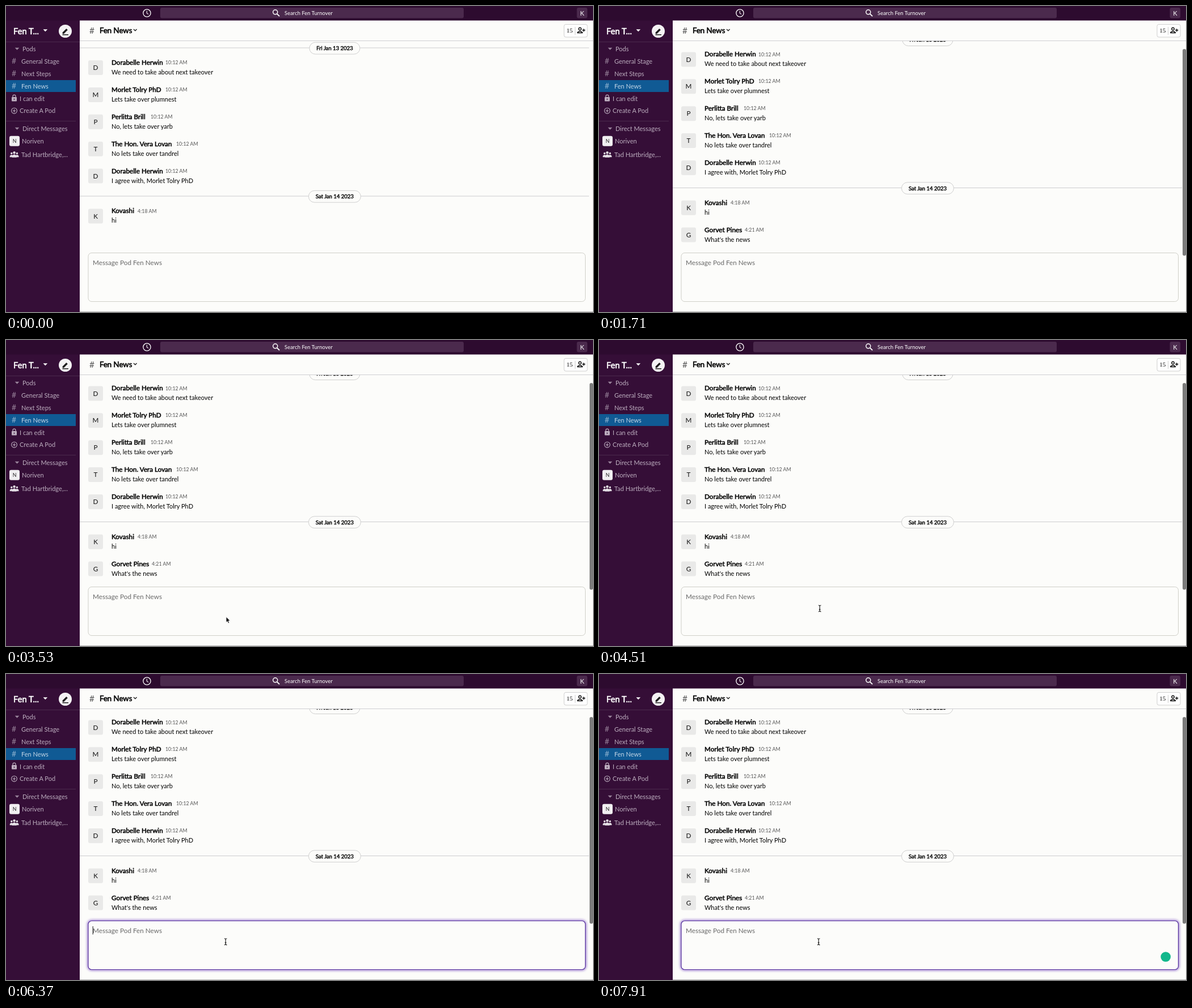
An HTML page that plays this animation: 1035 by 541 pixels, repeating every 8000 ms.

```html
<!DOCTYPE html>
<html lang="en">
<head>
<meta charset="utf-8">
<title>Team chat</title>
<style>
  html, body { margin: 0; width: 100%; height: 100%; overflow: hidden; background: #fcfcfa; }
  svg { display: block; width: 100vw; height: 100vh; font-family: Lato, "Open Sans", sans-serif; }
  text { white-space: pre; }
</style>
</head>
<body>
<svg id="stage" viewBox="0 0 1035 541">
  <defs>
    <clipPath id="feedClip"><rect x="130" y="62" width="905" height="374"/></clipPath>
    <filter id="blur" x="-5%" y="-20%" width="110%" height="140%"><feGaussianBlur stdDeviation="2"/></filter>
  </defs>
  <rect width="1035" height="541" fill="#fcfcfa"/>
  <g id="feed" clip-path="url(#feedClip)"><g id="scroller"></g></g>
  <g id="header"></g>
  <g id="sidebar"></g>
  <g id="topbar"></g>
  <g id="composer"></g>
  <path d="M130 540.5H1035" stroke="#b9b9b9"/>
  <rect id="thumb" x="1029" y="76" width="6" height="365.5" rx="3" fill="#7b7b7b"/>
  <path id="arrow" d="M0 0V9.6L2.2 7.6L3.7 11.2L5.4 10.5L3.9 7H6.9Z" fill="#000" stroke="#fff" stroke-width=".7"/>
  <path id="beam" d="M-2.3 -5.6Q0 -5.6 0 -4Q0 -5.6 2.3 -5.6M0 -4.5V4.5M-2.3 5.6Q0 5.6 0 4Q0 5.6 2.3 5.6M-1.3 1.8H1.3"
        fill="none" stroke="#111" stroke-width="1.1"/>
</svg>
<script>
const LOOP = 8000;
const TIMES = { message: 1350, arrow: 2600, beam: 4400, focus: 5600, badge: 7700 };
const SCROLL = 14.6;
const PAGE = "#fcfcfa", SIDE = "#350e37", TOP = "#2d0b2f", FIELD = "#4b2a4d";
const NS = "http://www.w3.org/2000/svg";
const $ = id => document.getElementById(id);

function add(parent, tag, attrs, content) {
  const node = document.createElementNS(NS, tag);
  for (const key in attrs) node.setAttribute(key, attrs[key]);
  if (content !== undefined) node.textContent = content;
  parent.appendChild(node);
  return node;
}
const label = (parent, content, x, y, size, fill, extra) =>
  add(parent, "text", { x, y, "font-size": size, fill, ...extra }, content);
// Regular letters thickened by an outline, keeping the regular spacing.
const heavy = (parent, content, x, y, size, fill, extra) =>
  label(parent, content, x, y, size, fill, { stroke: fill, "stroke-width": size * .045, ...extra });
const box = (parent, x, y, width, height, rx, fill, extra) =>
  add(parent, "rect", { x, y, width, height, rx, fill, ...extra });
const line = (parent, d, stroke, width = 1, extra) =>
  add(parent, "path", { d, stroke, "stroke-width": width, fill: "none", ...extra });
const shape = (parent, d, fill) => add(parent, "path", { d, fill });
const disc = (parent, cx, cy, r, fill, extra) => add(parent, "circle", { cx, cy, r, fill, ...extra });
const centered = { "text-anchor": "middle" };

function buildTopbar(g) {
  const white = "#fff";
  box(g, 0, 0, 1035, 25.6, 0, TOP);
  disc(g, 248.5, 12.5, 6.6, "none", { stroke: white, "stroke-width": 1.3 });
  line(g, "M248.3 8.6V12.8L251.2 14.6", white, 1.1);
  box(g, 272, 3, 535, 18.5, 3, FIELD);
  disc(g, 474.8, 10.8, 4, "none", { stroke: white, "stroke-width": 1.5 });
  line(g, "M477.8 13.8L482.2 18.2", white, 1.8);
  label(g, "Search Fen Turnover", 491, 16.3, 9.5, white);
  box(g, 1006.5, 3, 18.5, 18.5, 3, FIELD);
  label(g, "K", 1015.8, 16.7, 11, white, centered);
}

function buildSidebar(g) {
  const soft = "#bdaebf", dim = "#9a859c", bright = "#e4dfe5";
  box(g, 0, 25, 130, 516, 0, SIDE);
  line(g, "M0 63.5H130M0 203.5H123", "#4b2a4d");
  heavy(g, "Fen T...", 13, 50, 14.66, "#fff");
  shape(g, "M65.5 41.3H73.2L69.3 45.3Z", "#fff");
  disc(g, 104.5, 44.5, 11.5, "#f4f2f4");
  shape(g, "M99.6 46.8L106.4 39.9L108.8 42.3L102 49.2H99.6Z", "#1d1c1d");
  line(g, "M99.5 50.8H110", "#1d1c1d", 1.5);

  box(g, 0, 131, 123, 21, 0, "#105a94");
  for (const [name, y] of [["Pods", 80], ["Direct Messages", 221]]) {
    shape(g, `M15.7 ${y - 6.2}H23.3L19.5 ${y - 2.2}Z`, dim);
    label(g, name, 29, y, 11, soft);
  }
  ["General Stage", "Next Steps", "Fen News"].forEach((name, i) => {
    const y = 101.8 + i * 22;
    label(g, "#", 10, y + .2, 14, i === 2 ? "#8fb3d0" : dim);
    label(g, name, 27, y, 11, i === 2 ? "#c4d6e6" : soft);
  });

  box(g, 10, 161, 9, 7.6, 1, soft);
  line(g, "M12 161.5V159.6A2.5 2.5 0 0 1 17 159.6V161.5", soft, 1.2);
  disc(g, 14.5, 164.8, 1, SIDE);
  label(g, "I can edit", 24, 167.5, 11, soft);
  disc(g, 14.5, 185.2, 4.9, "none", { stroke: soft, "stroke-width": 1.1 });
  line(g, "M14.5 182.5V188M11.8 185.2H17.2", soft, 1.1);
  label(g, "Create A Pod", 24, 189.4, 11, soft);

  box(g, 6, 229.7, 18, 18, 3, "#f1eff1");
  label(g, "N", 15, 241.8, 8.8, "#1d1c1d", centered);
  label(g, "Noriven", 28, 243, 11, soft);
  for (const [x, y, r] of [[9.8, 260.5, 1.7], [19.4, 260.5, 1.7], [14.6, 259.2, 2.2]]) {
    disc(g, x, y, r, bright);
    shape(g, `M${x - r * 1.8} ${y + r * 3.9}V${y + r * 2.6}Q${x} ${y + r * .2} ${x + r * 1.8} ${y + r * 2.6}V${y + r * 3.9}Z`, bright);
  }
  label(g, "Tad Hartbridge,...", 27, 267, 11, soft);
}

function buildHeader(g) {
  box(g, 130, 25, 905, 37, 0, PAGE);
  line(g, "M130 61.5H1035", "#cfcfd2");
  label(g, "#", 147, 48.5, 15.5, "#555");
  heavy(g, "Fen News", 165, 48.2, 13.2, "#000");
  line(g, "M225 41L227.8 43.8L230.6 41", "#222", 1.4);
  box(g, 984, 32.5, 41, 22.5, 3, "#fff", { stroke: "#cfcfcf" });
  label(g, "15", 993.7, 47, 11, "#111", { ...centered, "font-family": "Liberation Serif, serif" });
  line(g, "M1003.5 37V51", "#cfcfcf");
  disc(g, 1012, 40.4, 2.2, "none", { stroke: "#111", "stroke-width": 1.4 });
  line(g, "M1007.8 47.5V46.6Q1012 42.9 1016.2 46.6V47.5Z", "#111", 1.4);
  line(g, "M1018.7 40.2V45.4M1016.1 42.8H1021.3", "#111", 1.4);
}

function addDate(g, content, y, half) {
  line(g, `M130 ${y - .7}H1028`, "#cdcdcf");
  box(g, 579.5 - half, y - 10.4, half * 2, 20.8, 10.4, PAGE, { stroke: "#cfcfcf" });
  heavy(g, content, 579.5, y + 3.4, 9.5, "#000", centered);
}

function addMessage(g, name, timeX, time, content, y) {
  const row = add(g, "g", {});
  box(row, 145, y - 8, 26, 26, 3, "#e9e9e8");
  label(row, name[0], 158, y + 9.2, 11.7, "#111", centered);
  heavy(row, name, 186, y, 11.73, "#000");
  label(row, time, timeX, y - .8, 8.8, "#555");
  label(row, content, 186, y + 17, 11, "#000");
  return row;
}

function buildFeed(g) {
  addDate(g, "Fri Jan 13 2023", 74.7, 44.5);
  [
    ["Dorabelle Herwin", 281, "We need to take about next takeover"],
    ["Morlet Tolry PhD", 281, "Lets take over plumnest"],
    ["Perlitta Brill", 255, "No, lets take over yarb"],
    ["The Hon. Vera Lovan", 300, "No lets take over tandrel"],
    ["Dorabelle Herwin", 281, "I agree with, Morlet Tolry PhD"],
  ].forEach(([name, x, content], i) => addMessage(g, name, x, "10:12 AM", content, 104 + i * 47.9));
  addDate(g, "Sat Jan 14 2023", 336.8, 46);
  addMessage(g, "Kovashi", 232, "4:18 AM", "hi", 366.4);
  return addMessage(g, "Gorvet Pines", 257, "4:21 AM", "What's the news", 414.2);
}

function buildComposer(g) {
  const frame = [145, 436.5, 876.5, 86, 6];
  const glow = box(g, ...frame, "none", { stroke: "#7a4fc0", "stroke-width": 3, filter: "url(#blur)" });
  const field = box(g, ...frame, PAGE);
  label(g, "Message Pod Fen News", 153, 457.8, 11.73, "#686868");
  const caret = line(g, "M153.2 446V460.5", "#111");
  const badge = disc(g, 999.2, 500, 8.8, "#12b88c");
  return { glow, field, caret, badge };
}

buildTopbar($("topbar"));
buildSidebar($("sidebar"));
buildHeader($("header"));
const newest = buildFeed($("scroller"));
const composer = buildComposer($("composer"));

const show = (node, on) => node.setAttribute("visibility", on ? "visible" : "hidden");
const move = (node, x, y) => node.setAttribute("transform", `translate(${x} ${y})`);

function render(t) {
  const arrived = t >= TIMES.message;
  const focused = t >= TIMES.focus;
  show(newest, arrived);
  show($("thumb"), arrived);
  move($("scroller"), 0, arrived ? -SCROLL : 0);

  show($("arrow"), t >= TIMES.arrow && t < TIMES.beam);
  move($("arrow"), 388.2, 489.6);
  show($("beam"), t >= TIMES.beam);
  const p = Math.min(1, Math.max(0, (t - TIMES.focus + 150) / 150));
  move($("beam"), 389.2 - 2 * p, 474.6 - 1.3 * p);

  show(composer.glow, focused);
  composer.field.setAttribute("stroke", focused ? "#55309c" : "#cfcfc8");
  composer.field.setAttribute("stroke-width", focused ? 1.2 : 1);
  show(composer.caret, focused && t % 1000 < 500);
  show(composer.badge, t >= TIMES.badge);
}

const start = performance.now();
function tick() {
  render((performance.now() - start) % LOOP);
  requestAnimationFrame(tick);
}
render(0);
requestAnimationFrame(tick);
</script>
</body>
</html>
```
